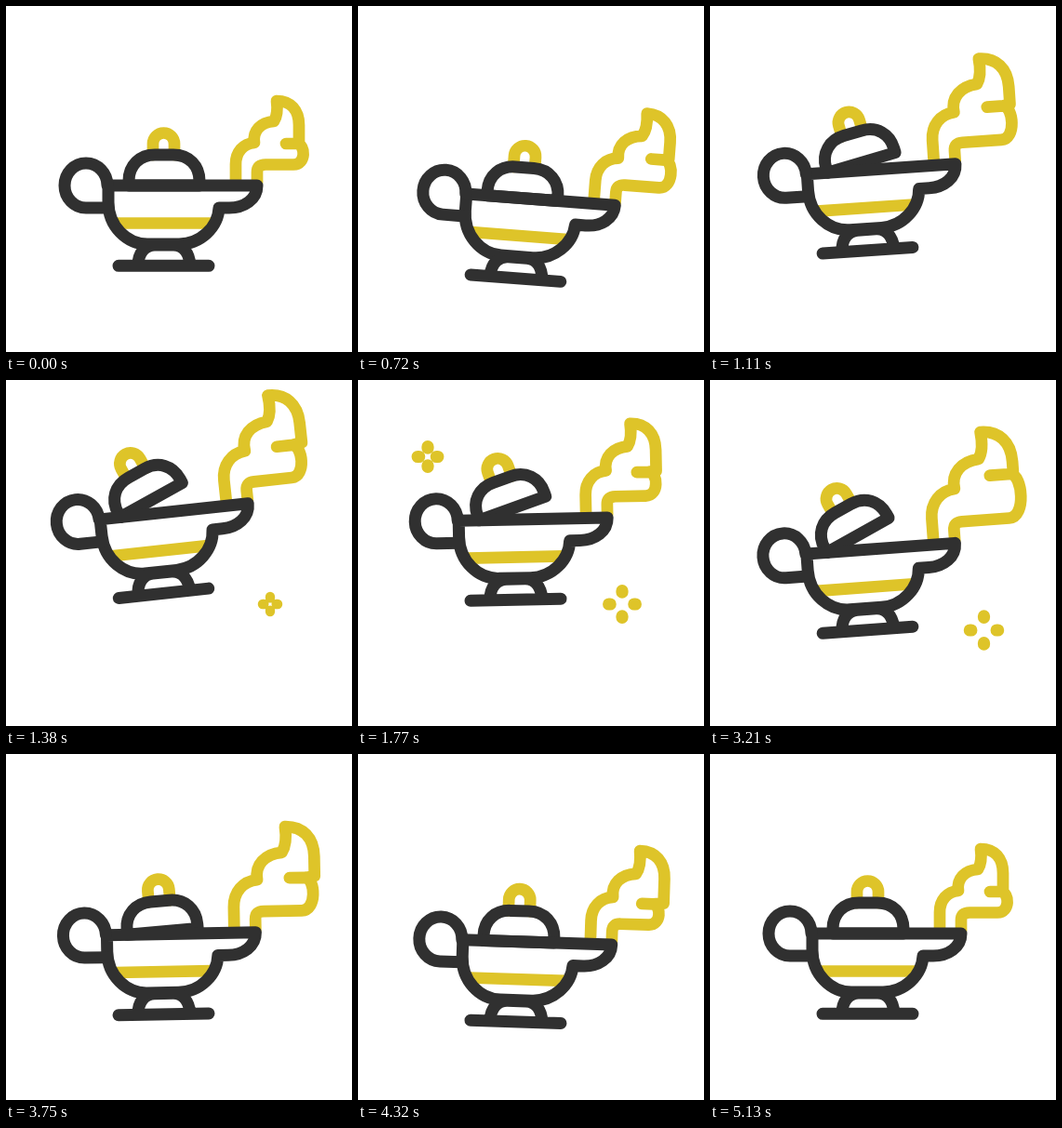
Animation, 372 px wide and 372 px high, one loop 5400 ms. Source, as an HTML page:

```html
<!DOCTYPE html>
<html lang="en">
<head>
<meta charset="utf-8">
<title>Magic lamp</title>
<style>
html, body { margin: 0; width: 100%; height: 100%; overflow: hidden; background: #fff; }
svg { display: block; width: 100vw; height: 100vh; }
path { fill: none; stroke: #303030; stroke-width: 13; stroke-linecap: round; stroke-linejoin: round; }
.gold { stroke: #dec429; stroke-width: 12.7; }
.flat { stroke-linecap: butt; }
</style>
</head>
<body>
<svg viewBox="0 0 372 372">
  <g id="lamp">
    <path id="smoke" class="gold"/>
    <path class="gold flat" d="M118 233.5H222"/>
    <g id="lid">
      <path class="gold" d="M158 160V148a11.5 11.5 0 0 1 23 0V160"/>
      <path d="M132 193V188C132 171 144 160 160 160H180C197 160 208 172 208 188V193Z"/>
    </g>
    <path d="M110 193V211C110 237 130 256 152 256H186C209 256 228 238 229 217H240C256 217 270 208 270 193Z"/>
    <path d="M109 193A23 24 0 1 0 86 217H109"/>
    <path d="M142 279C142 265 150 257 160 257H180C190 257 197 265 198 279M121 279.3H218"/>
  </g>
  <g id="stars"></g>
</svg>
<script>
const LOOP = 5400, STEP = 30, STAR_LIFE = 720;
const $ = id => document.getElementById(id);

// Turning points [time, value] of each motion
const lift = [[180, 0], [860, 15], [1370, -50], [1770, -43], [3210, -10.5], [4450, 9], [5130, 0]];
const tilt = [[180, 0], [870, 5], [1230, -7], [1770, -1.2], [2500, 3.6], [2960, -4.7], [4450, 2], [5130, 0]];
const open = [[780, 0], [1400, -23], [2500, -6], [3150, -25.5], [3950, 0]];
const plume = [[180, 0], [1330, 0.85], [2100, 0.05], [3280, 1], [5130, 0]];
const puff = [[180, 0], [1200, 0.57], [2020, 0], [3210, 1], [4320, 0]];

// Monotone cubic through the points, flat at every extreme
function at(track, t) {
  const last = track.length - 1;
  if (t <= track[0][0]) return track[0][1];
  if (t >= track[last][0]) return track[last][1];
  let i = 0;
  while (t > track[i + 1][0]) i++;
  const rise = k => (track[k + 1][1] - track[k][1]) / (track[k + 1][0] - track[k][0]);
  const slope = k => {
    if (k === 0 || k === last) return 0;
    const a = rise(k - 1), b = rise(k);
    return a * b > 0 ? 2 * a * b / (a + b) : 0;
  };
  const [t0, v0] = track[i], [t1, v1] = track[i + 1];
  const h = t1 - t0, p = (t - t0) / h, q = 1 - p;
  return v0 * q * q * (1 + 2 * p) + v1 * p * p * (3 - 2 * p)
    + h * p * q * (slope(i) * q - slope(i + 1) * p);
}

// The plume u stretches away from the spout, the puff v swells above its lower edge
function smokePath(u, v) {
  const spread = (x, w) => x + 0.34 * w * (x - 247);
  const top = (x, y) => `${spread(x, u)} ${y - 0.31 * u * (187 - y)} `;
  const low = (x, y, w = v) => `${spread(x, w)} ${y - 1.1 * v * (170.5 - y)} `;
  const knot = low(313, 148);
  return 'M247 190L' + top(247, 170)
    + 'C' + top(247, 157) + top(255, 148) + top(267, 147)
    + 'C' + top(265, 134) + top(274, 125) + top(288, 124)
    + 'C' + top(292, 118) + top(292, 110) + top(291, 102)
    + 'C' + top(306, 102) + top(315, 112) + top(315, 128)
    + 'L' + low(315, 147, u) + 'L' + knot
    + 'C' + low(322, 149) + low(323, 170.5) + low(309, 170.5)
    + 'L279 170.5C273 170.5 270 173 270 179V190'
    + 'M' + low(301 - 5 * v, 148) + 'L' + knot;
}

const stars = [[75, 82.5, 1530], [284, 241, 1310], [239.5, 39, 1960], [294.5, 269, 2700]].map(([x, y, start]) => {
  const el = document.createElementNS('http://www.w3.org/2000/svg', 'path');
  el.setAttribute('class', 'gold');
  el.setAttribute('transform', `translate(${x} ${y})`);
  $('stars').append(el);
  return { el, start };
});

function drawStar({ el, start }, t) {
  const p = (t - start) / STAR_LIFE;
  const shown = p > 0 && p < 1;
  el.style.display = shown ? '' : 'none';
  if (!shown) return;
  const far = 7 + 11.5 * p, near = far - 1.5;
  el.setAttribute('d', `M${near} 0H${far}M${-near} 0H${-far}M0 ${near}V${far}M0 ${-near}V${-far}`);
  el.style.strokeWidth = 13.2 * Math.min(1, p * 8, (1 - p) * 8);
}

function draw(t) {
  $('lamp').setAttribute('transform', `translate(0 ${at(lift, t)}) rotate(${at(tilt, t)} 169.5 279)`);
  $('lid').setAttribute('transform', `rotate(${at(open, t)} 132 193)`);
  $('smoke').setAttribute('d', smokePath(at(plume, t), at(puff, t)));
  stars.forEach(s => drawStar(s, t));
}

const begin = performance.now();
function tick() {
  const t = (performance.now() - begin) % LOOP;
  draw(Math.floor(t / STEP) * STEP);
  requestAnimationFrame(tick);
}
tick();
</script>
</body>
</html>
```
